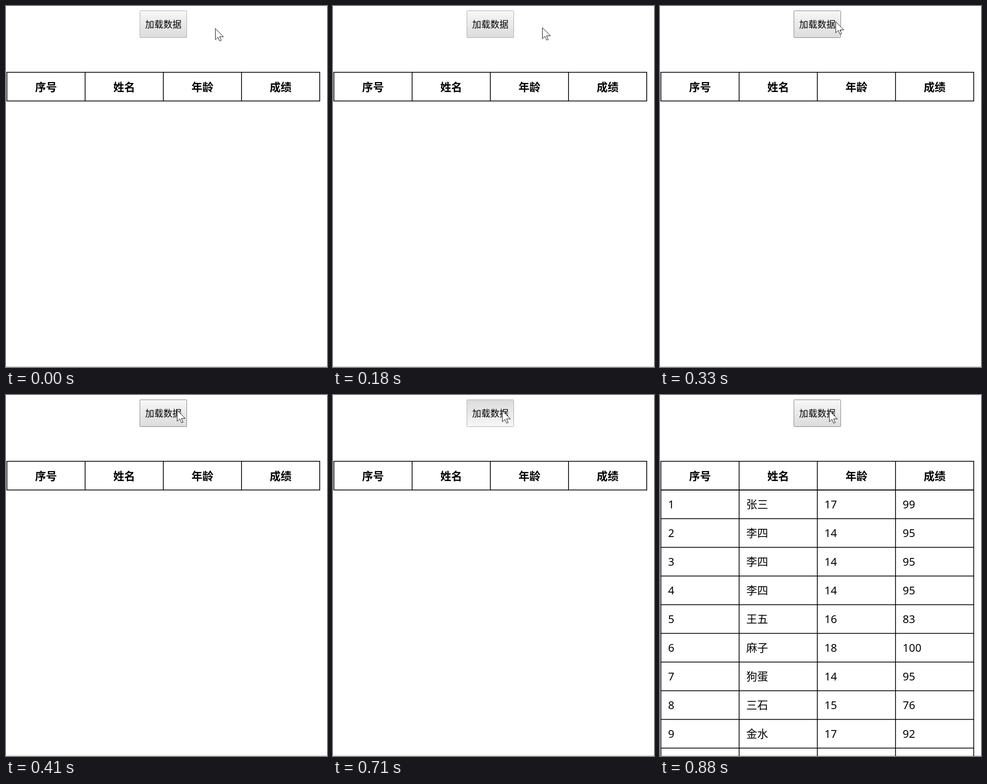
An HTML page for the animation above (1890 ms loop, 706 px wide and 793 px high).

```html
<!DOCTYPE html>
<html lang="zh-CN">
<head>
<meta charset="utf-8">
<style>
html, body { margin: 0; width: 100%; height: 100%; overflow: hidden; background: #fff; }
svg { display: block; }
text { font: 24px "Noto Sans", "Noto Sans CJK SC", "Noto Sans CJK", sans-serif; }
.head { font-weight: bold; text-anchor: middle; }
.lines { fill: none; stroke: #000; stroke-width: 1.7; }
</style>
</head>
<body>
<svg width="706" height="793" viewBox="0 0 706 793">
  <defs>
    <linearGradient id="up" x2="0" y2="1"><stop stop-color="#f7f7f7"/><stop offset="1" stop-color="#dcdcdc"/></linearGradient>
    <linearGradient id="down" x2="0" y2="1"><stop stop-color="#dcdcdc"/><stop offset="1" stop-color="#f7f7f7"/></linearGradient>
  </defs>
  <path d="M0 792.5H706" stroke="#c0c0c0"/>
  <rect id="button" x="294.5" y="10.5" width="103" height="59" rx="1"/>
  <text x="346" y="48" text-anchor="middle" style="font-size:20px">加载数据</text>
  <g id="header"></g>
  <g id="rows"></g>
  <path id="cursor" d="M.5 .5V25L6 19.5L10 28L13.5 26.5L9.7 18.5H18.2Z" fill="#fff" stroke="#000"/>
</svg>
<script>
const LOOP = 1890, LEFT = 2, TOP = 145.7, COL = 172, ROW = 63;
const get = id => document.getElementById(id);
const button = get('button'), cursor = get('cursor'), rows = get('rows');

const people = [
  ['张三', 17, 99], ['李四', 14, 95], ['李四', 14, 95], ['李四', 14, 95], ['王五', 16, 83],
  ['麻子', 18, 100], ['狗蛋', 14, 95], ['三石', 15, 76], ['金水', 17, 92]
];
// Pointer stops: start time, x, y
const stops = [
  [0, 460, 49], [180, 460, 47], [250, 427, 40], [330, 386, 34],
  [410, 376, 33], [485, 373, 34], [560, 372, 34]
];

const label = (s, x, y, cls = '') => `<text class="${cls}" x="${x}" y="${y}">${s}</text>`;

function grid(y, count) {
  let d = '';
  for (let i = 0; i <= count; i++) d += `M1 ${y + i * ROW}H691`;
  for (let i = 0; i < 5; i++) d += `M${LEFT + i * COL} ${y}V${y + count * ROW}`;
  return `<path class="lines" d="${d}"/>`;
}

get('header').innerHTML = grid(TOP, 1) + ['序号', '姓名', '年龄', '成绩']
  .map((s, i) => label(s, LEFT + (i + .5) * COL, 187, 'head')).join('');

rows.innerHTML = grid(TOP + ROW, people.length + 1) + people.map((p, r) =>
  [r + 1, ...p].map((s, i) => label(s, LEFT + i * COL + 15.8, 249.3 + r * ROW)).join('')
).join('');

function draw(now) {
  const t = now % LOOP;
  const [, x, y] = stops.findLast(s => s[0] <= t);
  const pressed = t >= 710 && t < 880;
  const hover = x < 398 && !pressed;
  cursor.setAttribute('transform', `translate(${x} ${y})`);
  button.setAttribute('fill', pressed ? 'url(#down)' : 'url(#up)');
  button.setAttribute('stroke', hover ? '#7b7b7b' : '#a9a9a9');
  rows.setAttribute('visibility', t >= 880 ? 'visible' : 'hidden');
}

const start = performance.now();
function tick() {
  draw(performance.now() - start);
  requestAnimationFrame(tick);
}
tick();
</script>
</body>
</html>
```
